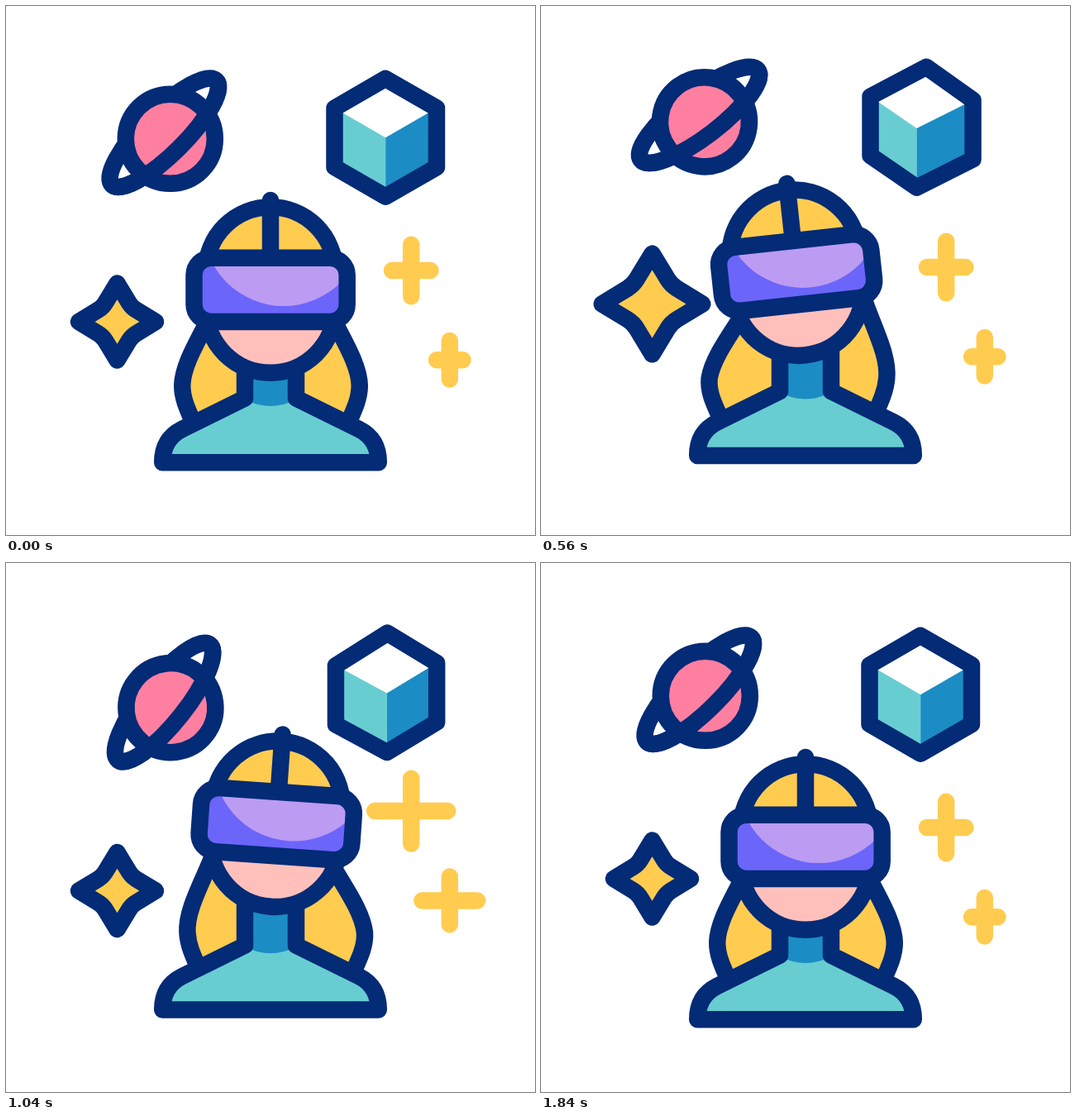
Animation of 640x640 px, one loop 1880 ms. Source, as an HTML page with a canvas:

```html
<!DOCTYPE html>
<html lang="en">
<head>
<meta charset="utf-8">
<title>Virtual reality</title>
<style>
html, body { margin: 0; width: 100%; height: 100%; overflow: hidden; background: #fff; }
canvas { display: block; width: 640px; height: 640px; }
</style>
</head>
<body>
<canvas id="stage" width="640" height="640"></canvas>
<script>
const ctx = document.getElementById('stage').getContext('2d');
const LOOP = 1880, STEP = 40, LINE = 20.5;
const NAVY = '#032b76', YELLOW = '#ffcc50', TEAL = '#68cdd1', BLUE = '#1b8dc4',
      PINK = '#ff7fa1', SKIN = '#ffc0bb', VIOLET = '#6b65fa', LILAC = '#bc9bf2';

// Key times and values, eased in and out between neighbours
const keys = {
  bodyY: [[100, 0], [870, -13], [1800, 0]],
  headY: [[40, 0], [800, -28], [1105, -28], [1685, 0]],
  headTurn: [[60, 0], [650, -6.6], [1090, 4.4], [1260, 4.4], [1690, 0]],
  planetY: [[60, 0], [640, -21.5], [1080, 15.3], [1530, 0]],
  planetTurn: [[100, 0], [680, 8.5], [1020, -6.6], [1360, 0]],
  starY: [[40, 0], [480, -24], [1000, 15], [1400, 0]],
  starSize: [[300, 46.5], [620, 62.3], [900, 46.5]],
  plusY: [[400, 0], [980, -22], [1400, 16], [1810, 0]],
  plusA: [[640, 0], [1170, 1], [1670, 0]],
  plusB: [[670, 0], [1240, 1], [1770, 0]]
};

// Corner offsets of the cube: top, left, right, front
const cubeTimes = [360, 750, 1285, 1660];
const cubePoses = [
  [0, 0, 0, 0, 0, 0, 0, 0],
  [14, -27, 2, -27, 3, -18.5, -9, -21.5],
  [-6.6, 15.5, 1, 22, -2, 10, 10, 13.7],
  [0, 0, 0, 0, 0, 0, 0, 0]
];

function ease(list, t) {
  if (t <= list[0][0]) return list[0][1];
  for (let i = 1; i < list.length; i++) {
    const [t0, a] = list[i - 1], [t1, b] = list[i];
    if (t < t1) {
      const u = (t - t0) / (t1 - t0);
      return a + (b - a) * u * u * (3 - 2 * u);
    }
  }
  return list[list.length - 1][1];
}

function paint(path, fill, stroke) {
  if (fill) { ctx.fillStyle = fill; ctx.fill(path); }
  if (stroke) { ctx.strokeStyle = stroke; ctx.stroke(path); }
}

function poly(points) {
  return new Path2D('M' + points.map(p => p.join(' ')).join('L') + 'Z');
}

function placed(x, y, degrees, draw) {
  ctx.save();
  ctx.translate(x, y);
  ctx.rotate(degrees * Math.PI / 180);
  draw();
  ctx.restore();
}

function ringPart(end) {
  const path = new Path2D();
  path.ellipse(0, -10.6, 89.2, 26, 0, 0, end);
  return path;
}
const ring = ringPart(Math.PI * 2), ringFront = ringPart(Math.PI);

function circle(x, y, r) {
  const path = new Path2D();
  path.arc(x, y, r, 0, Math.PI * 2);
  return path;
}

function box(x, y, w, h, r) {
  const path = new Path2D();
  path.roundRect(x, y, w, h, r);
  return path;
}

const globe = circle(0, 0, 54);
function planet(v) {
  placed(198.8 + v.planetY * .04, 160.7 + v.planetY, v.planetTurn - 45, () => {
    paint(ring, null, NAVY);
    paint(globe, PINK, NAVY);
    paint(ringFront, null, NAVY);
  });
}

function cube(t) {
  const d = cubePoses[0].map((_, i) => ease(cubeTimes.map((k, n) => [k, cubePoses[n][i]]), t));
  const top = [459 + d[0], 87.8 + d[1]];
  const left = [397.5 + d[2], 123.5 + d[3]];
  const right = [521 + d[4], 123.5 + d[5]];
  const front = [459.2 + d[6], 159.2 + d[7]];
  const low = ([x, y]) => [x, y + 71.5];
  paint(poly([top, right, front, left]), '#fff');
  paint(poly([left, front, low(front), low(left)]), TEAL);
  paint(poly([front, right, low(right), low(front)]), BLUE);
  paint(poly([top, right, low(right), low(front), low(left), left]), null, NAVY);
}

function star(v) {
  placed(134.5, 382 + v.starY, 0, () => {
    const path = new Path2D(), s = v.starSize;
    for (let i = 0; i < 4; i++) {
      const c = Math.cos(i * Math.PI / 2) * s, n = Math.sin(i * Math.PI / 2) * s;
      const at = (x, y) => [x * c - y * n, x * n + y * c];
      path.lineTo(...at(0, -1));
      path.lineTo(...at(.31, -.49));
      path.quadraticCurveTo(...at(.378, -.378), ...at(.49, -.31));
    }
    path.closePath();
    paint(path, YELLOW, NAVY);
  });
}

function plus(x, y, w, h) {
  const a = w - LINE / 2, b = h - LINE / 2;
  paint(new Path2D(`M${x - a} ${y}h${2 * a}M${x} ${y - b}v${2 * b}`), null, YELLOW);
}

// Side strands: the ends lag sideways while the roots stay put
function strand(side, drag) {
  const at = (x, y) => {
    const w = Math.min(1.15, (y - 385) / 74);
    return `${320 + side * (x - 320) + drag * w} ${y}`;
  };
  return `M${at(255, 358)}C${at(238, 396)} ${at(213.5, 430)} ${at(212.7, 459)}` +
         `C${at(212.7, 475)} ${at(219, 488)} ${at(228, 508)}`;
}

function hair(v) {
  const drag = v.headTurn * 1.55;
  placed(.5, v.bodyY, 0, () => {
    for (const side of [1, -1]) {
      const line = strand(side, drag);
      paint(new Path2D(line + 'L320 508L320 358Z'), YELLOW);
      paint(new Path2D(line), null, NAVY);
    }
  });
}

const bust = new Path2D('M189.2 552.3C189.2 532 198 519.5 213 512L289 474.5V410H351V474.5L427 512' +
                        'C442 519.5 450.8 532 450.8 552.3Z');
const neck = new Path2D('M289 410H351V476Q320 492 289 476Z');
function body(v) {
  placed(0, v.bodyY, 0, () => {
    paint(bust, TEAL);
    paint(neck, BLUE);
    paint(bust, null, NAVY);
  });
}

const skull = box(242, 243.2, 156, 200.6, 78);
const goggles = box(227.5, 304.7, 185.2, 77.3, 21);
const glare = circle(336, 265.5, 97.5);
const seam = new Path2D('M320 235V305');
function head(v) {
  placed(320, 445 + v.headY, v.headTurn, () => {
    ctx.translate(-320, -445);
    ctx.save();
    ctx.clip(skull);
    paint(box(230, 230, 180, 114, 0), YELLOW);
    paint(box(230, 344, 180, 110, 0), SKIN);
    ctx.restore();
    paint(skull, null, NAVY);
    paint(seam, null, NAVY);
    ctx.save();
    ctx.clip(goggles);
    paint(goggles, VIOLET);
    paint(glare, LILAC);
    ctx.restore();
    paint(goggles, null, NAVY);
  });
}

function draw(t) {
  const v = {};
  for (const name in keys) v[name] = ease(keys[name], t);
  ctx.fillStyle = '#fff';
  ctx.fillRect(0, 0, 640, 640);
  ctx.lineWidth = LINE;
  ctx.lineCap = ctx.lineJoin = 'round';
  planet(v);
  cube(t);
  star(v);
  plus(490.2, 320 + v.plusY, 33.5 + 24.5 * v.plusA, 41.5 + 9.5 * v.plusA);
  plus(536.8, 428.3 + v.plusY, 26 + 24.5 * v.plusB, 33.5 + 7.8 * v.plusB);
  hair(v);
  body(v);
  head(v);
}

const start = performance.now();
function tick() {
  const t = (performance.now() - start) % LOOP;
  draw(Math.floor(t / STEP) * STEP);
  requestAnimationFrame(tick);
}
tick();
</script>
</body>
</html>
```
